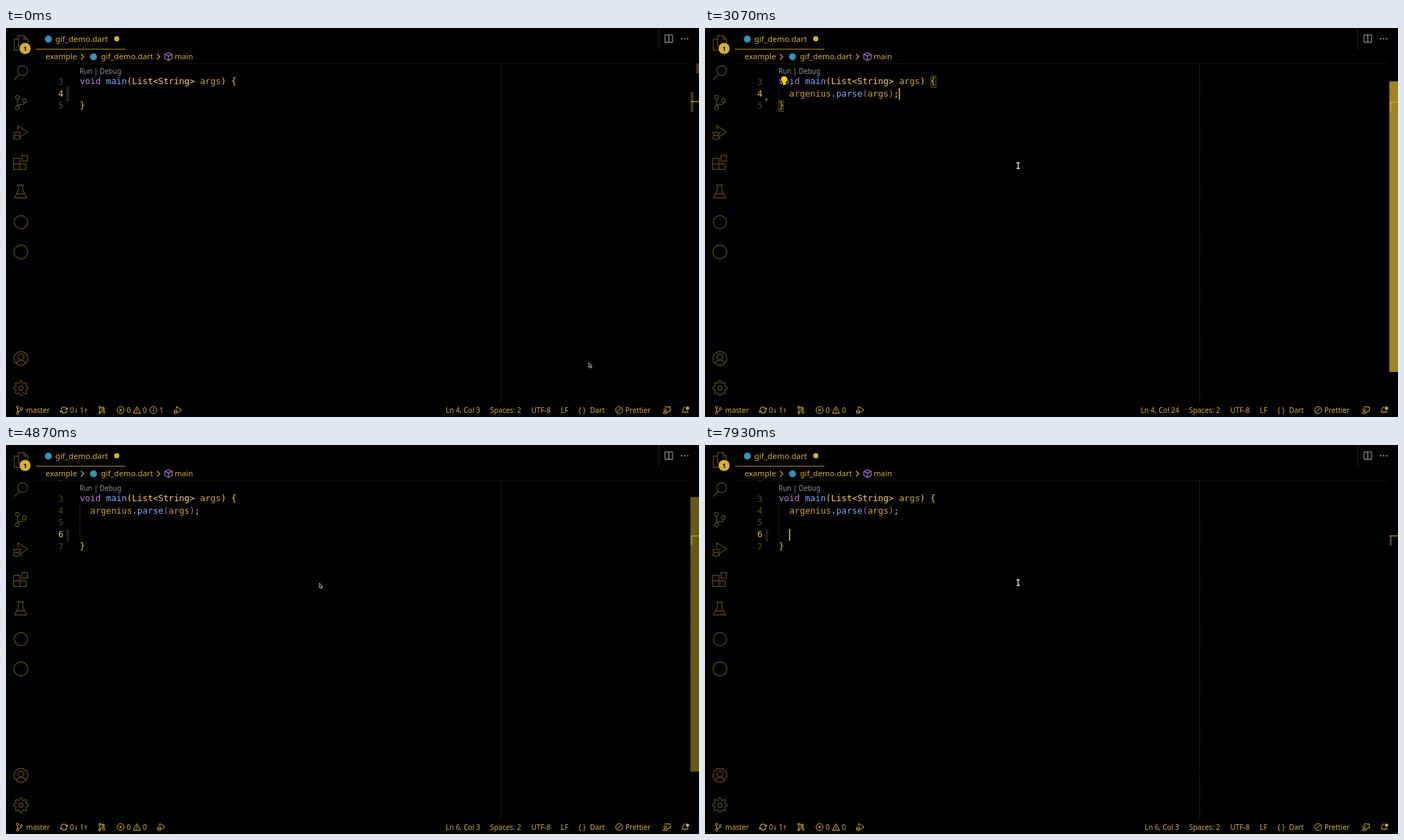
Write an HTML page with a canvas that moves like this. It is 998x561 px and loops after 8 s.

```html
<!DOCTYPE html>
<html lang="en">
<head>
<meta charset="utf-8">
<title>Editor demo</title>
<style>
html, body { margin: 0; width: 100%; height: 100%; overflow: hidden; background: #000; }
canvas { display: block; width: 998px; height: 561px; }
</style>
</head>
<body>
<canvas id="stage" width="998" height="561"></canvas>
<script>
const ctx = document.getElementById('stage').getContext('2d');
const LOOP = 8000;
const GOLD = '#d4af37', DIM = '#534413', GREY = '#aaa6b0';
const UI = '"Noto Sans", "Open Sans", sans-serif';
const MONO = '12.5px "DejaVu Sans Mono", monospace';
const CODE_X = 106.3, CHAR = 7.525, LINE = 17.25;

// Event times in ms
const HOVER = 830, FOCUS = 1170, PASTE = 2960, LINT = 3050,
      ENTER1 = 3350, ENTER2 = 3530, ARROW = 4450, FADE = 4570,
      BLUR = 4660, BEAM = 5590, REFOCUS = 7870;

const clamp = v => Math.max(0, Math.min(1, v));
const ease = v => v * v * (3 - 2 * v);
const span = (t, a, b) => clamp((t - a) / (b - a));

function text(s, x, y, font, color, align = 'left') {
  ctx.font = font;
  ctx.fillStyle = color;
  ctx.textAlign = align;
  ctx.fillText(s, x, y);
}
const ui = (s, x, y, size, color = GOLD, align) => text(s, x, y, size + 'px ' + UI, color, align);

function rect(x, y, w, h, color) {
  ctx.fillStyle = color;
  ctx.fillRect(x, y, w, h);
}
function disc(x, y, r, color) {
  ctx.fillStyle = color;
  ctx.beginPath();
  ctx.arc(x, y, r, 0, 7);
  ctx.fill();
}
// Strokes a path given around the point x, y
function icon(x, y, d, color = GOLD, width = 1) {
  ctx.save();
  ctx.translate(x, y);
  ctx.strokeStyle = color;
  ctx.lineWidth = width;
  ctx.stroke(new Path2D(d));
  ctx.restore();
}
const ring = (x, y, r) => `M${x + r} ${y}A${r} ${r} 0 1 1 ${x - r} ${y}A${r} ${r} 0 1 1 ${x + r} ${y}Z`;

function gearPath() {
  let d = '';
  for (let i = 0; i < 32; i++) {
    const a = (i - 0.5) * Math.PI / 16, r = i % 4 < 2 ? 10.5 : 7.8;
    d += (i ? 'L' : 'M') + (r * Math.cos(a)).toFixed(2) + ' ' + (r * Math.sin(a)).toFixed(2);
  }
  return d + 'Z' + ring(0, 0, 3);
}

const BRANCH = ring(-4.5, -7, 2.8) + ring(5.5, -2.5, 2.8) + ring(-4.5, 8, 2.8) +
  'M-4.5 -4V5M5.5 .5C5.5 4 2 3.5 -1 3.5Q-4.5 3.5 -4.5 5';
const SIDE_ICONS = [
  [21, 21, 'M-3 -10H5L10 -5V5H-3ZM5 -10V-5H10M-3 -5H-9V11H3V5'],
  [21, 64, ring(3, -2.5, 7) + 'M-2 3L-9 10.5'],
  [21, 107, BRANCH],
  [21, 150, 'M-4 -3V-9L10 0L-1 7.5M-5 0A4 4 0 0 1 -1 4V7A4 4 0 0 1 -9 7V4A4 4 0 0 1 -5 0ZM-9 5H-1M-8 2L-11 0M-2 2L1 0M-9 8L-11 10M-1 8L1 10'],
  [21, 194, 'M-10 -6H-1V10H-10ZM-10 2H8V10H-1M2 -10H10V-2H2Z'],
  [21, 236, 'M-5 -9.5H5M-3 -9.5V-3L-8.5 9H8.5L3 -3V-9.5M-6 3H6'],
  [21.5, 280, ring(0, 0, 9.5)],
  [21.5, 323, ring(0, 0, 10)],
  [21.5, 476.5, ring(0, 0, 10) + ring(0, -2, 4.3) + 'M-6.5 7.5Q-5 2.5 0 2.5T6.5 7.5'],
  [21.5, 519.5, gearPath()]
];

function drawFrameParts() {
  for (const [x, y, d] of SIDE_ICONS) icon(x, y, d, DIM, 1.4);
  disc(27.5, 29.5, 8, GOLD);
  text('1', 27.5, 33, 'bold 9px ' + UI, '#000', 'center');

  // Tab row
  disc(61, 16, 5, '#3c8fb5');
  ui('gif_demo.dart', 71, 19.5, 11.5);
  disc(159.5, 15.5, 3.7, GOLD);
  rect(43, 30, 129, 1, '#a98b2b');
  rect(939.5, 0, 1, 31, '#2c2820');
  icon(954.5, 15, 'M-5.5 -5H5.5V5.5H-5.5ZM0 -5V5.5', GREY, 1);
  for (let i = -1; i < 2; i++) disc(977.3 + i * 4.4, 15.5, 1.1, GREY);

  // Breadcrumbs
  ui('example', 57, 45, 11.3);
  disc(126, 41.5, 5, '#3c8fb5');
  ui('gif_demo.dart', 136.7, 45, 11.4);
  icon(234, 41, 'M0 -5.5L5.3 -3V3L0 5.8L-5.3 3V-3ZM-5.3 -3L0 -.4L5.3 -3M0 -.4V5.8', '#a77bd0', 1.1);
  ui('main', 243, 45, 11.1);
  for (const x of [110, 219.5]) icon(x, 41.5, 'M-2 -4L2 0L-2 4', GOLD, 1.1);

  rect(43, 51, 942, 1, '#14110a');
  rect(76, 51, 6, 1, '#3a3218');
  ctx.setLineDash([2, 1]);
  icon(712.5, 51, 'M0 0V490', '#28243c', 1);
  ctx.setLineDash([]);
}

function drawStatus(t) {
  const y = 555, size = 10.3, lint = t < LINT;
  const put = (s, x) => ui(s, x, y, size);
  icon(19, 551, ring(-2.4, -4, 1.6) + ring(3, -1.8, 1.6) + ring(-2.4, 4.2, 1.6) + 'M-2.4 -2.4V2.6M3 -.2Q3 2 -2.4 2.2');
  put('master', 29);
  icon(83.5, 551, 'M-4.2 -1A4.3 4.3 0 0 1 4 -1.5M4.2 1A4.3 4.3 0 0 1 -4 1.5M1.8 -1H5V-3.5M-1.8 1H-5V3.5', GOLD, 1.1);
  put('0', 92);
  icon(101, 551.5, 'M0 -2.5V3M-1.5 1.5L0 3L1.5 1.5', GOLD, 0.9);
  put('1', 106.3);
  icon(114.8, 551.5, 'M0 3V-2.5M-1.5 -1L0 -2.5L1.5 -1', GOLD, 0.9);
  icon(138, 551, ring(-3, -4, 1.4) + ring(-3, 4, 1.4) + ring(1.2, -1.5, 1.4) + ring(3.2, 3.4, 1.4) +
    'M-3 -2.6V2.6M1.2 -.1V1Q1.2 2.4 -3 2.4M-1.6 -4H3.2V2');
  icon(165, 551, ring(0, 0, 5) + 'M-2 -2L2 2M2 -2L-2 2');
  put('0', 173.8);
  icon(188.5, 551, 'M0 -5L5.2 4.6H-5.2ZM0 -1.6V1.6M0 2.5V3.6');
  put('0', 197);
  if (lint) {
    icon(212.3, 551, ring(0, 0, 5) + 'M0 -2.8V-1.5M0 -.5V3');
    put('1', 220.7);
  }
  icon(lint ? 247.5 : 223.5, 551, 'M-2 -2V-5L5.5 -.2L0 3.6M-3 -.5A2.2 2.2 0 0 1 -.8 2V3A2.2 2.2 0 0 1 -5.2 3V2A2.2 2.2 0 0 1 -3 -.5M-5.2 2.5H-.8');

  const pos = t < PASTE ? 'Ln 4, Col 3' : t < ENTER1 ? 'Ln 4, Col 24' : t < ENTER2 ? 'Ln 5, Col 3' : 'Ln 6, Col 3';
  ui(pos, 683, y, size, GOLD, 'right');
  put('Spaces: 2', 697);
  put('UTF-8', 756.5);
  put('LF', 799);
  put('{ }', 824.5);
  put('Dart', 841);
  icon(883, 551, ring(0, 0, 5) + 'M-3.5 3.5L3.5 -3.5');
  put('Prettier', 892);
  icon(951.5, 551, 'M-3 -4.5H5V1.5H3L1.5 3.5V1.5M.5 4.8Q0 2 -2.2 2T-5 4.8Z' + ring(-2.2, -.3, 1.8));
  icon(978, 551, 'M-4.5 3Q-3 1 -3 -1.5Q-2.5 -4.5 .5 -4.5M-4.5 3H4.5L3 .8M-1 3.2Q0 5.5 1.2 3.2');
  disc(981.5, 548.3, 2.4, GOLD);
}

// parts: pairs of string and colour
function code(row, col, parts) {
  for (const [s, color] of parts) {
    text(s, CODE_X + col * CHAR, Math.round(81.3 + row * LINE), MONO, color);
    col += s.length;
  }
}

function hatch(y, h) {
  ctx.save();
  ctx.beginPath();
  ctx.rect(87, y, 4, h);
  ctx.clip();
  for (let k = -4; k < h + 4; k += 3) icon(87, y + k, 'M0 4L4 0', '#6f5b22', 1);
  ctx.restore();
}

function caretAlpha(t) {
  if (t >= REFOCUS) return 1;
  if (t < FOCUS || t >= BLUR) return 0;
  const start = t < PASTE ? FOCUS : t < ENTER1 ? PASTE : t < ENTER2 ? ENTER1 : ENTER2;
  const u = (t - start) % 1000;
  return 1 - ease(span(u > 500 ? 1000 - u : u, 100, 300));
}

function drawEditor(t) {
  const pasted = t >= PASTE;
  const extra = t < ENTER1 ? 0 : t < ENTER2 ? 1 : 2;
  const active = 1 + extra, last = 2 + extra;

  ui('Run | Debug', 106, 65.5, 9.9, '#96939b');
  for (let i = 0; i <= last; i++)
    text(String(i + 3), 75.2, Math.round(81.5 + i * LINE), MONO, i === active ? '#d6bd5c' : '#57491c');

  code(0, 0, [['void ', '#b583da'], ['main', '#82aaff'], ['(', '#f0c828'], ['List', '#ffcb6b'],
    ['<', '#e8d49a'], ['String', '#ffcb6b'], ['>', '#e8d49a'], [' args', '#c9a23a'], [') {', '#f0c828']]);
  if (pasted) {
    code(1, 2, [['argenius', '#c9a23a'], ['.', '#89ddff'], ['parse', '#82aaff'], ['(', '#b865b5'],
      ['args', '#c9a23a'], [')', '#b865b5'], [';', '#a9d4dc']]);
    ctx.setLineDash([1, 1]);
    icon(106.5, 86, `M0 0V${LINE * (1 + extra)}`, '#453a18');
    ctx.setLineDash([]);
  }
  code(last, 0, [['}', '#f0c828']]);

  if (t >= FOCUS && t < BLUR) {
    icon(325.5, 69.5, 'M0 0H7V16H0Z', '#62571d');
    icon(106.5, Math.round(69 + last * LINE) + 0.5, 'M0 0H6V16H0Z', '#62571d');
  }

  // Change marks in the gutter
  if (t < LINT) hatch(84, 21);
  else if (!extra) {
    ctx.fillStyle = '#6b5820';
    ctx.fill(new Path2D('M87 100L91 103.3L87 106.6Z'));
  } else hatch(87 + active * LINE - 17, 17);

  // Light bulb
  if (t >= LINT && t < ENTER1) {
    disc(114, 74, 4.6, '#ffcc00');
    rect(112, 77, 4, 5, '#ffcc00');
  }

  const col = pasted && !extra ? 23 : 2;
  ctx.globalAlpha = caretAlpha(t);
  rect(CODE_X + col * CHAR - 0.3, 69.2 + active * LINE, 1.6, 17, '#e9b52b');
  ctx.globalAlpha = 1;

  drawScroll(t, extra);
}

function drawScroll(t, extra) {
  const clean = t >= LINT;
  const markY = clean ? [107, 119, 131][extra] : 106;
  if (!clean) {
    rect(994, 51, 4, 15, '#4a3d15');
    rect(986, 92, 4, 29, '#43380f');
  } else rect(986, markY, 3, 14, '#4d4119');
  rect(986, markY - 0.5, 12, 1.2, extra ? '#b29a4e' : '#d9ad25');

  ctx.globalAlpha = 0.75 * span(t, HOVER, HOVER + 100) * (1 - span(t, FADE, FADE + 870));
  rect(985.5, 77 - extra, 12.5, 419 - extra * 11.5, GOLD);
  ctx.globalAlpha = 1;
}

function mouseAt(t) {
  const stops = [[770, 1200, 839, 482], [1330, 1530, 649, 317], [1620, 1900, 512, 245.5], [0, 0, 451, 198.5]];
  let [, , x, y] = stops[0];
  for (let i = 0; i < 3; i++) {
    const k = ease(span(t, stops[i][0], stops[i][1]));
    x += (stops[i + 1][2] - stops[i][2]) * k;
    y += (stops[i + 1][3] - stops[i][3]) * k;
  }
  return [x, y];
}

function drawMouse(t) {
  const [x, y] = mouseAt(t);
  if (t < HOVER || (t >= ARROW && t < BEAM)) {
    ctx.save();
    ctx.translate(x + 0.2, y + 0.5);
    ctx.lineWidth = 0.9;
    ctx.fillStyle = '#181818';
    ctx.strokeStyle = '#bdbdbd';
    const p = new Path2D('M0 0V7L1.5 5.6L2.7 8L3.9 7.4L2.8 5.1H5Z');
    ctx.fill(p);
    ctx.stroke(p);
    ctx.restore();
  } else icon(x, y, 'M-2.3 -4H2.3M0 -4V4M-2.3 4H2.3', '#f0f0f0', 1.3);
}

function draw(now) {
  const t = now % LOOP;
  rect(0, 0, 998, 561, '#000');
  drawFrameParts();
  drawEditor(t);
  drawStatus(t);
  drawMouse(t);
  requestAnimationFrame(draw);
}
requestAnimationFrame(draw);
</script>
</body>
</html>
```
